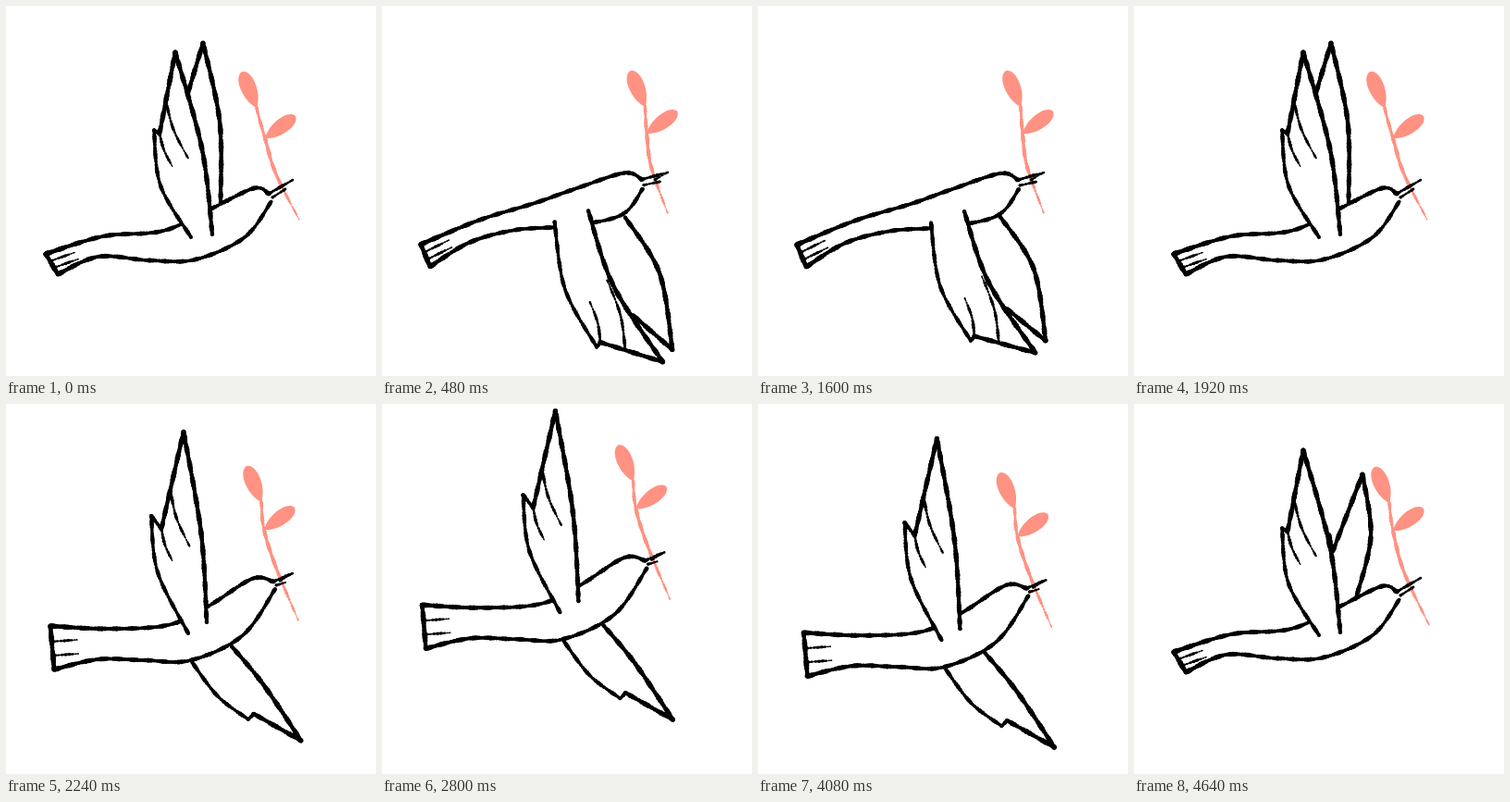
An HTML page with a canvas that plays this animation: 400 px wide and 400 px high, repeating every 4720 ms.

```html
<!DOCTYPE html>
<html lang="en">
<head>
<meta charset="utf-8">
<title>Flying dove</title>
<style>
  html, body { margin: 0; height: 100%; overflow: hidden; background: #fff; }
  canvas { display: block; width: 100vw; height: 100vh; }
</style>
</head>
<body>
<canvas id="stage" width="400" height="400"></canvas>
<script>
const ctx = document.getElementById('stage').getContext('2d');
const STEP = 80, STEPS = 59, INK = '#000', CORAL = '#ff9282';

const parse = pose => Object.fromEntries(Object.entries(pose).map(
  ([name, text]) => [name, text.split(' ').map(p => p.split(',').map(Number))]));

// A wing: front root, front edge, tip, notch, inner tip, back edge, back root.
// A stem: upper leaf, lower leaf, end.
const UP = parse({
  back: '43,268 105,249 170,243 222,219 268,197 284,203',
  belly: '56,290 100,271 155,275 205,274 258,250 287,211',
  near: '223,247 212,155 183,50 166,138 160,134 167,194 200,250',
  far: '232,213 231,125 213,40 197,93 196,97 200,150 212,220',
  stem: '271,110 280,143 317,231',
  beak: '310,188'
});
const DOWN = parse({
  back: '42,258 105,232 165,214 210,198 262,181 281,188',
  belly: '52,282 95,256 145,243 200,239 258,227 282,198',
  near: '223,222 249,298 300,375 234,357 230,362 197,303 187,234',
  far: '262,228 298,284 311,362 270,328 262,325 240,280 226,240',
  stem: '284,109 286,138 309,224',
  beak: '309,180'
});
const GLIDE = parse({
  back: '48,240 110,243 175,239 218,219 266,189 289,192',
  belly: '52,287 100,276 150,277 200,277 256,250 291,200',
  near: '217,236 211,140 192,30 168,135 157,121 164,182 197,248',
  far: '244,262 278,303 319,364 268,335 262,341 229,316 201,279',
  stem: '276,106 279,136 316,234',
  beak: '310,183'
});
const FOLD = { ...UP, ...parse({
  far: '240,210 256,143 247,76 215,159 211,141 208,170 214,210',
  stem: '276,107 280,137 319,239'
}) };

const lerp = ([x, y], [u, v], t) => [x + (u - x) * t, y + (v - y) * t];
const add = ([x, y], u, v) => [x + u, y + v];

function ease(t) {
  t = Math.min(1, Math.max(0, t));
  return t * t * (3 - 2 * t);
}

// Height of the glide: up, back down, a small dip, then level again.
const drift = s => -23 * ease((s - 28) / 7.5) + 28 * ease((s - 35.5) / 12) +
  6 * ease((s - 47.5) / 8.5) - 11 * ease((s - 56) / 2);

// Blends two poses; points that travel far swing out to the right.
function blend(a, b, w, swing) {
  const bulge = swing * Math.sin(Math.PI * Math.min(1, Math.max(0, w))) / 325;
  const mix = (p, q) => add(lerp(p, q, w), bulge * Math.abs(q[1] - p[1]), 0);
  return Object.fromEntries(Object.keys(a).map(
    name => [name, a[name].map((p, i) => mix(p, b[name][i]))]));
}

function poseAt(step) {
  if (step < 25) {
    const beat = step % 12;
    const w = ease((beat - 2) / 3) - ease((beat - 8) / 4);
    return blend(UP, DOWN, w - .03 * Math.sin(Math.PI * beat / 4), 40);
  }
  return blend(FOLD, GLIDE, ease((step - 25) / 3) - ease((step - 54.5) / 3.5), 80);
}

// Samples a Catmull-Rom curve through the points about once per pixel.
function curve(pts) {
  const out = [];
  for (let i = 0; i < pts.length - 1; i++) {
    const b = pts[i], c = pts[i + 1], a = pts[i - 1] || b, d = pts[i + 2] || c;
    const n = Math.max(2, Math.ceil(Math.hypot(c[0] - b[0], c[1] - b[1])));
    for (let j = 0; j <= n; j++) {
      const t = j / n;
      out.push([0, 1].map(k => b[k] + t / 2 * (c[k] - a[k] +
        t * (2 * a[k] - 5 * b[k] + 4 * c[k] - d[k] +
        t * (3 * (b[k] - c[k]) + d[k] - a[k])))));
    }
  }
  return out;
}

// Rough brush line whose width runs from start over middle to end.
function brush(pts, start, middle, end, color = INK) {
  const path = curve(pts);
  ctx.fillStyle = color;
  path.forEach(([x, y], i) => {
    const t = i / (path.length - 1);
    const side = t < .5 ? start : end;
    const width = side + (middle - side) * Math.sin(Math.PI * t);
    const rough = .3 * Math.sin(i * 1.9) + .3 * Math.sin(i * .37 + pts.length);
    ctx.beginPath();
    ctx.arc(x, y, Math.max(.5, width / 2 + rough), 0, 7);
    ctx.fill();
  });
}

function fillWhite(...edges) {
  ctx.beginPath();
  edges.flat().forEach(([x, y]) => ctx.lineTo(x, y));
  ctx.fillStyle = '#fff';
  ctx.fill();
}

function drawWing([root, front, tip, notch, inner, rear, end], filled) {
  if (filled) fillWhite(curve([root, front, tip]), curve([notch, inner]), curve([inner, rear, end]));
  brush([root, front, tip], 4, 4.6, 4.4);
  brush([tip, notch], 4.4, 4.6, 4);
  brush([notch, inner], 4, 4, 3.6);
  brush([inner, rear, end], 3.6, 3.6, 3.8);
  if (!filled) return;
  const base = lerp(root, end, .6);
  const quill = (from, reach) => {
    const dx = (base[0] - notch[0]) * reach, dy = (base[1] - notch[1]) * reach;
    brush([from, add(from, dx * .5 - dy * .06, dy * .5), add(from, dx, dy)], 3, 2.6, 1.4);
  };
  quill(lerp(tip, notch, .6), .56);
  quill(notch, .32);
}

function drawBody({ back, belly }) {
  fillWhite(curve(back), curve(belly).reverse());
  brush(back, 4.8, 4, 4);
  brush(belly, 4.6, 4, 3.6);
  brush([back[0], belly[0]], 4.6, 4.8, 4.6);
  const tail = lerp(back[0], belly[0], .5), hip = lerp(back[1], belly[1], .5);
  for (const t of [.36, .68]) {
    const from = lerp(back[0], belly[0], t);
    brush([from, add(from, (hip[0] - tail[0]) * .5, (hip[1] - tail[1]) * .5)], 2.8, 2.4, 1.4);
  }
}

function drawLeaf([x, y], dx, dy, fat) {
  const at = (u, v) => [x + dx * u - dy * v, y + dy * u + dx * v];
  ctx.beginPath();
  ctx.moveTo(x, y);
  ctx.bezierCurveTo(...at(.3, fat), ...at(.95, fat), ...at(1, 0));
  ctx.bezierCurveTo(...at(.95, -fat), ...at(.3, -fat), x, y);
  ctx.fillStyle = CORAL;
  ctx.fill();
}

function drawSprig({ stem: [upper, lower, end], beak: [tip] }) {
  brush([add(upper, -1, -20), upper, lower, add(tip, -18, -6), end], 2, 3.6, 1, CORAL);
  drawLeaf(upper, -16, -39, .27);
  drawLeaf(lower, 33, -24, .26);
}

function drawBeak({ back, belly, beak: [tip] }) {
  brush([back.at(-1), tip], 3.4, 3, 1.6);
  brush([tip, add(tip, -14, 8)], 1.6, 2.2, 2);
  brush([add(belly.at(-1), 1, -4), add(tip, -8, 10)], 2.4, 2.8, 1.8);
}

function draw(step) {
  const pose = poseAt(step), dy = drift(step);
  ctx.fillStyle = '#fff';
  ctx.fillRect(0, 0, 400, 400);
  ctx.save();
  ctx.translate(dy * .2, dy);
  drawWing(pose.far, false);
  drawBody(pose);
  drawSprig(pose);
  drawBeak(pose);
  drawWing(pose.near, true);
  ctx.restore();
}

let shown = -1;
function tick() {
  const step = Math.floor(performance.now() / STEP) % STEPS;
  if (step !== shown) draw(shown = step);
  requestAnimationFrame(tick);
}
tick();
</script>
</body>
</html>
```
